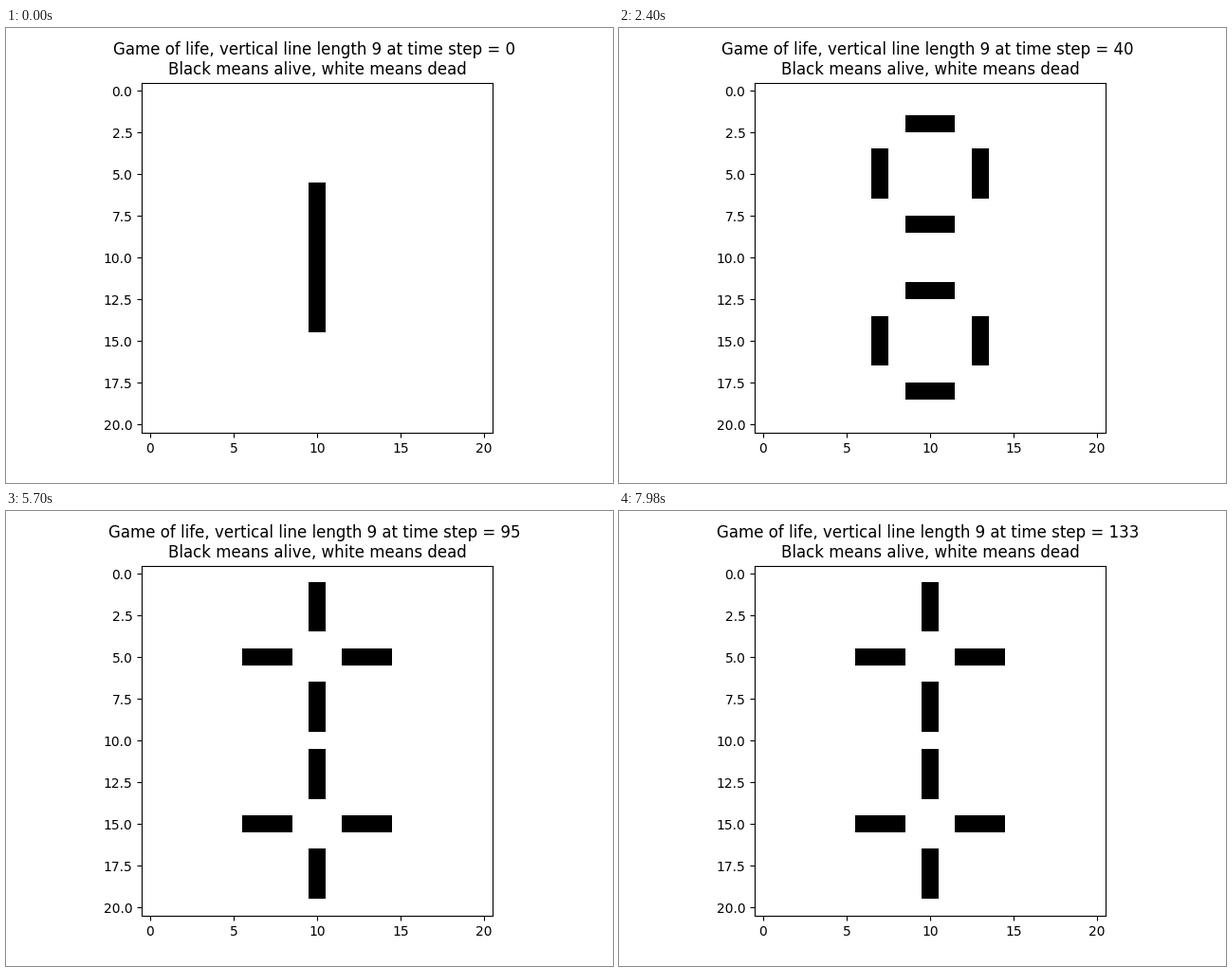
These frames come from a looping animation (640x480 px, 8000 ms). A matplotlib script:

```python
import numpy as np
import matplotlib.pyplot as plt
from matplotlib.animation import FuncAnimation

SIZE = 21
LENGTH = 9
LOOP_MS = 8000
STEP_MS = 60
TICK_MS = 20


def evolve(cells):
    """One Game of Life generation with dead cells beyond the border."""
    p = np.pad(cells, 1)
    around = sum(
        p[r:r + SIZE, c:c + SIZE]
        for r in range(3) for c in range(3) if (r, c) != (1, 1)
    )
    return ((around == 3) | ((cells == 1) & (around == 2))).astype(int)


def history(steps):
    cells = np.zeros((SIZE, SIZE), dtype=int)
    mid = SIZE // 2
    cells[mid - LENGTH // 2:mid + LENGTH // 2 + 1, mid] = 1
    states = [cells]
    while len(states) < steps:
        states.append(evolve(states[-1]))
    return states


def caption(step):
    # The trailing space shifts the first line slightly left of centre.
    return (f"Game of life, vertical line length {LENGTH} at time step = {step} \n"
            "Black means alive, white means dead")


states = history(-(-LOOP_MS // STEP_MS))

fig, ax = plt.subplots(figsize=(6.4, 4.8), dpi=100)
image = ax.imshow(states[0], cmap="binary", vmin=0, vmax=1,
                  interpolation="nearest")
title = ax.set_title(caption(0))


def update(tick):
    step = tick * TICK_MS // STEP_MS
    image.set_data(states[step])
    title.set_text(caption(step))
    return image, title


anim = FuncAnimation(fig, update, frames=LOOP_MS // TICK_MS,
                     interval=TICK_MS, repeat=True, repeat_delay=0)
plt.show()
```
